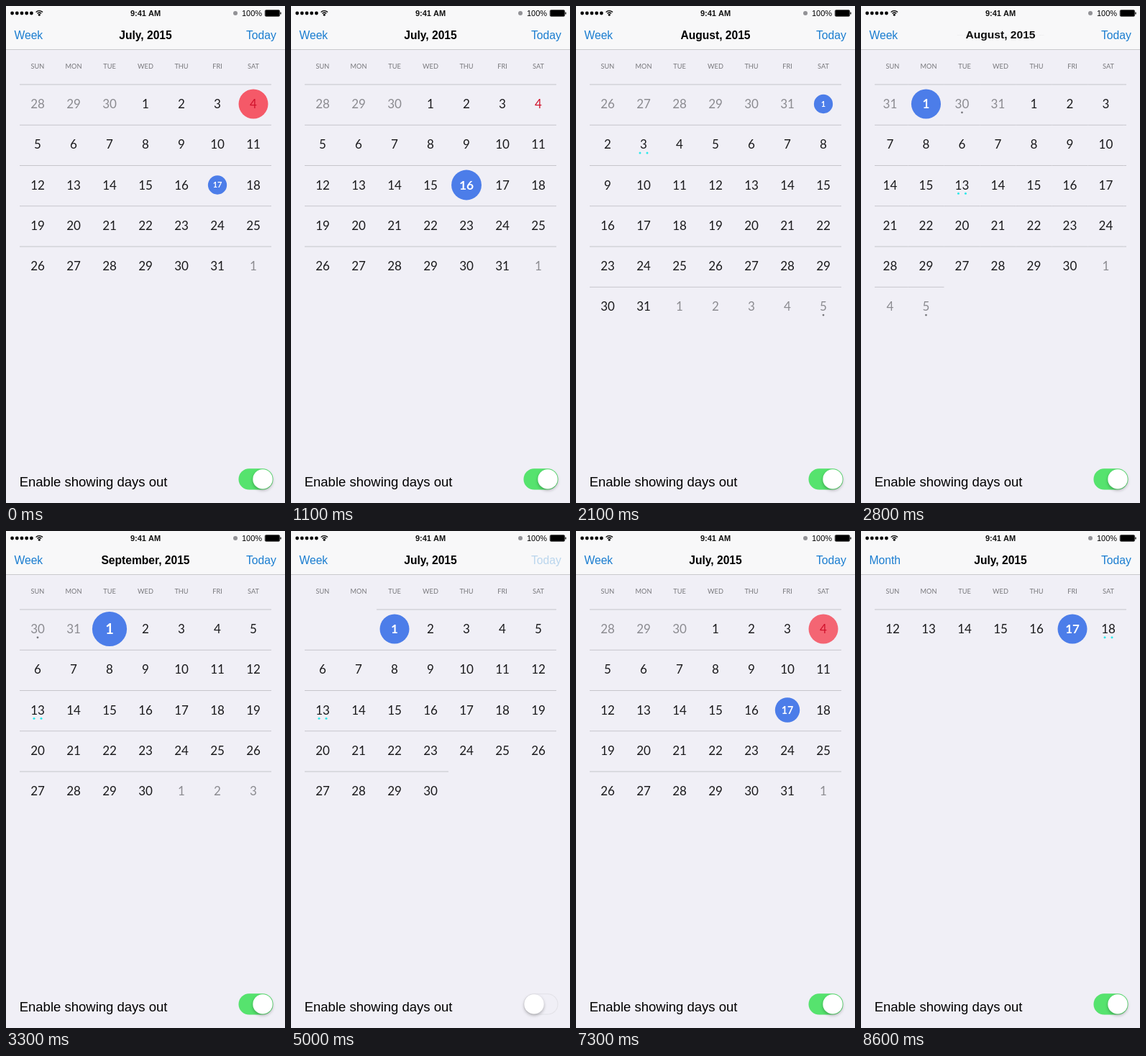
These frames come from a looping animation (388x690 px, 8.7 s). An HTML page with a canvas:

```html
<!DOCTYPE html>
<html lang="en">
<head>
<meta charset="utf-8">
<title>Calendar</title>
<style>
  html, body { margin: 0; width: 100%; height: 100%; overflow: hidden; background: #f0eff6; }
  canvas { display: block; width: 388px; height: 690px; }
</style>
</head>
<body>
<canvas id="stage"></canvas>
<script>
const W = 388, H = 690, LOOP = 8700;
const canvas = document.getElementById('stage');
const ctx = canvas.getContext('2d');
const dpr = window.devicePixelRatio || 1;
canvas.width = W * dpr;
canvas.height = H * dpr;

const SANS = '"Liberation Sans", Arial, sans-serif';
const ROUND = 'Lato, sans-serif';
const BLUE = 'rgb(76,125,233)', RED = 'rgb(246,75,90)', LINK = '#1a7dd0';
const BACK = '#f0eff6', CYAN = '#2ce8ea', GREY = '#8b8b90';
const COL = 50, ROW = 56.25, LEFT = 19, PAGE = 350;

// dots: cell index -> number of markers
const july = { name: 'July, 2015', lead: 3, days: 31, before: 30, dots: {} };
const august = { name: 'August, 2015', lead: 6, days: 31, before: 31, dots: { 8: 2, 41: 1 } };
const september = { name: 'September, 2015', lead: 2, days: 30, before: 31, dots: { 0: 1, 14: 2 } };
const julyWeek = { ...july, dots: { 20: 2 } };

const selections = [
  { month: july, day: 4, from: -1000, to: -37, color: RED },
  { month: july, day: 17, from: -37, to: 650, color: BLUE },
  { month: july, day: 16, from: 650, to: 3000, color: BLUE },
  { month: august, day: 1, from: 2063, to: LOOP, color: BLUE },
  { month: september, day: 1, from: 3150, to: LOOP, color: BLUE },
  { month: july, day: 4, from: 5050, to: 7235, color: RED },
  { month: july, day: 17, from: 7235, to: LOOP, color: BLUE },
  { month: julyWeek, day: 17, from: 7235, to: LOOP, color: BLUE }
];
const titles = [
  { name: july.name, at: -1000 },
  { name: august.name, at: 1650 },
  { name: september.name, at: 2740 },
  { name: july.name, at: 4620 }
];

const progress = (t, start, length) => Math.min(1, Math.max(0, (t - start) / length));
const smooth = x => x * x * (3 - 2 * x);
const easeOut = x => 1 - (1 - x) ** 2.4;

// Underdamped bounce from half size to full size
function bounce(ms) {
  const decay = 7, freq = 21, s = ms / 1000;
  return 1 - 0.5 * Math.exp(-decay * s) * (Math.cos(freq * s) + decay / freq * Math.sin(freq * s));
}

function text(str, x, y, font, color, align = 'center') {
  ctx.font = font;
  ctx.fillStyle = color;
  ctx.textAlign = align;
  ctx.fillText(str, x, y);
}

function circle(x, y, r, color) {
  ctx.fillStyle = color;
  ctx.beginPath();
  ctx.arc(x, y, r, 0, 7);
  ctx.fill();
}

function pill(x, y, w, h, r, color) {
  ctx.fillStyle = color;
  ctx.beginPath();
  ctx.roundRect(x, y, w, h, r);
  ctx.fill();
}

function withAlpha(alpha, draw) {
  if (alpha <= 0) return;
  const old = ctx.globalAlpha;
  ctx.globalAlpha = old * alpha;
  draw();
  ctx.globalAlpha = old;
}

function drawDay(t, month, cell, row, x) {
  const y = 136 + row * ROW;
  const day = cell - month.lead + 1;
  const out = day < 1 || day > month.days;
  const label = day < 1 ? day + month.before : out ? day - month.days : day;
  const cx = x + (cell % 7) * COL + 25;

  ctx.fillStyle = '#c6c5cb';
  ctx.fillRect(cx - 25, 108.5 + row * ROW, COL, 1);

  const pick = selections.findLast(s => s.month === month && s.day === day && s.from <= t);
  if (pick && t < pick.to) {
    const size = bounce(t - pick.from);
    ctx.save();
    ctx.translate(cx, y);
    ctx.scale(size, size);
    circle(0, 0, 20.5, pick.color);
    text(label, 0, 6, `bold 17px ${ROUND}`, '#fff');
    ctx.restore();
    return;
  }
  if (pick) withAlpha(1 - progress(t, pick.to, 400), () => circle(cx, y, 20.5, pick.color));
  const today = month.name === july.name && day === 4;
  text(label, cx, y + 6, `17px ${ROUND}`, out ? GREY : today ? '#d0122b' : '#1a1a1c');

  const dots = month.dots[cell];
  if (dots === 1) circle(cx, y + 11.8, 1.4, '#77777c');
  if (dots === 2) for (const dx of [-5, 5]) circle(cx + dx, y + 11.8, 1.5, CYAN);
}

function drawMonth(t, month, x, outAlpha) {
  const cells = Math.ceil((month.lead + month.days) / 7) * 7;
  for (let cell = 0; cell < cells; cell++) {
    const out = cell < month.lead || cell >= month.lead + month.days;
    withAlpha(out ? outAlpha : 1, () => drawDay(t, month, cell, Math.floor(cell / 7), x));
  }
}

function drawWeek(t) {
  for (let cell = 14; cell < 21; cell++) drawDay(t, julyWeek, cell, 0, LEFT);
}

function drawCalendar(t, outAlpha) {
  ctx.save();
  ctx.beginPath();
  ctx.rect(LEFT, 100, PAGE, 540);
  ctx.clip();
  if (t < 5000) {
    const scroll = easeOut(progress(t, 1450, 600)) + easeOut(progress(t, 2560, 580));
    [july, august, september].forEach((month, i) => {
      if (Math.abs(i - scroll) < 1) drawMonth(t, month, LEFT + (i - scroll) * PAGE, outAlpha);
    });
  } else {
    const toToday = smooth(progress(t, 5000, 800));
    const toWeek = smooth(progress(t, 8130, 420));
    withAlpha(1 - toToday, () => drawMonth(t, september, LEFT, outAlpha));
    withAlpha(toToday * (1 - toWeek), () => drawMonth(t, july, LEFT, outAlpha));
    withAlpha(toWeek, () => drawWeek(t));
  }
  ctx.restore();
}

function drawTitle(t) {
  const current = titles.findLastIndex(e => e.at <= t);
  const p = progress(t, titles[current].at, 350) ** 1.7;
  const label = (name, amount) => withAlpha(amount, () => {
    ctx.save();
    ctx.translate(194, 40);
    ctx.scale(1, 0.1 + 0.9 * amount);
    text(name, 0, 5.5, `bold 15.6px ${SANS}`, '#000');
    ctx.restore();
  });
  if (current > 0) label(titles[current - 1].name, 1 - p);
  label(titles[current].name, p);
}

function drawStatus() {
  for (let i = 0; i < 5; i++) circle(8.6 + i * 6.7, 10, 2.4, '#000');
  ctx.strokeStyle = '#000';
  ctx.lineWidth = 1.4;
  for (const r of [3.8, 6.4]) {
    ctx.beginPath();
    ctx.arc(46.3, 13, r, -Math.PI * 0.76, -Math.PI * 0.24);
    ctx.stroke();
  }
  circle(46.3, 12.3, 1.5, '#000');
  text('9:41 AM', 194, 14, `bold 11px ${SANS}`, '#111');
  circle(319, 10, 3, '#929296');
  text('100%', 328, 14, `11px ${SANS}`, '#000', 'left');
  ctx.lineWidth = 0.7;
  ctx.beginPath();
  ctx.roundRect(360.2, 5.6, 20.4, 8.8, 1.5);
  ctx.stroke();
  pill(360.6, 6, 19.6, 8, 1, '#000');
  pill(381.3, 8.4, 1.3, 3.2, 0.6, '#000');
}

function drawNav(t) {
  ctx.fillStyle = '#f8f8f9';
  ctx.fillRect(0, 0, W, 60);
  ctx.fillStyle = '#c9c9cd';
  ctx.fillRect(0, 60, W, 1);
  drawStatus();
  drawTitle(t);

  // Buttons dim at once when pressed and recover slowly
  const pressed = (down, up) => t < down ? 1 : 0.28 + 0.72 * progress(t, up, 400);
  const font = `15.7px ${SANS}`;
  withAlpha(pressed(8020, 8130), () =>
    text(t < 8150 ? 'Week' : 'Month', 11.4, 45.5, font, LINK, 'left'));
  withAlpha(pressed(4880, 5020), () => text('Today', 375.8, 45.5, font, LINK, 'right'));
}

function drawSwitch(on) {
  text('Enable showing days out', 18.7, 666.8, `18.5px ${SANS}`, '#000', 'left');
  pill(323.5, 642.2, 48, 29.4, 14.7, '#e2e1e7');
  pill(324.5, 643.2, 46, 27.4, 13.7, BACK);
  withAlpha(on, () => pill(323.5, 642.2, 48, 29.4, 14.7, '#56e36e'));
  ctx.save();
  ctx.shadowColor = 'rgba(0,0,0,.28)';
  ctx.shadowBlur = 4 * dpr;
  ctx.shadowOffsetY = 2 * dpr;
  circle(338 + 19 * on, 656.9, 13.7, '#fff');
  ctx.restore();
}

function render(t) {
  ctx.setTransform(dpr, 0, 0, dpr, 0, 0);
  ctx.globalAlpha = 1;
  ctx.fillStyle = BACK;
  ctx.fillRect(0, 0, W, H);

  const fade = (off, on, length) =>
    1 - smooth(progress(t, off, length)) + smooth(progress(t, on, length));
  drawNav(t);
  ['SUN', 'MON', 'TUE', 'WED', 'THU', 'FRI', 'SAT'].forEach((name, i) =>
    text(name, LEFT + 25 + i * COL, 87.2, `9.2px ${ROUND}`, '#77777b'));
  drawCalendar(t, fade(4050, 6700, 400));
  drawSwitch(fade(4000, 6650, 280));
}

function frame() {
  render(performance.now() % LOOP);
  requestAnimationFrame(frame);
}
frame();
</script>
</body>
</html>
```
